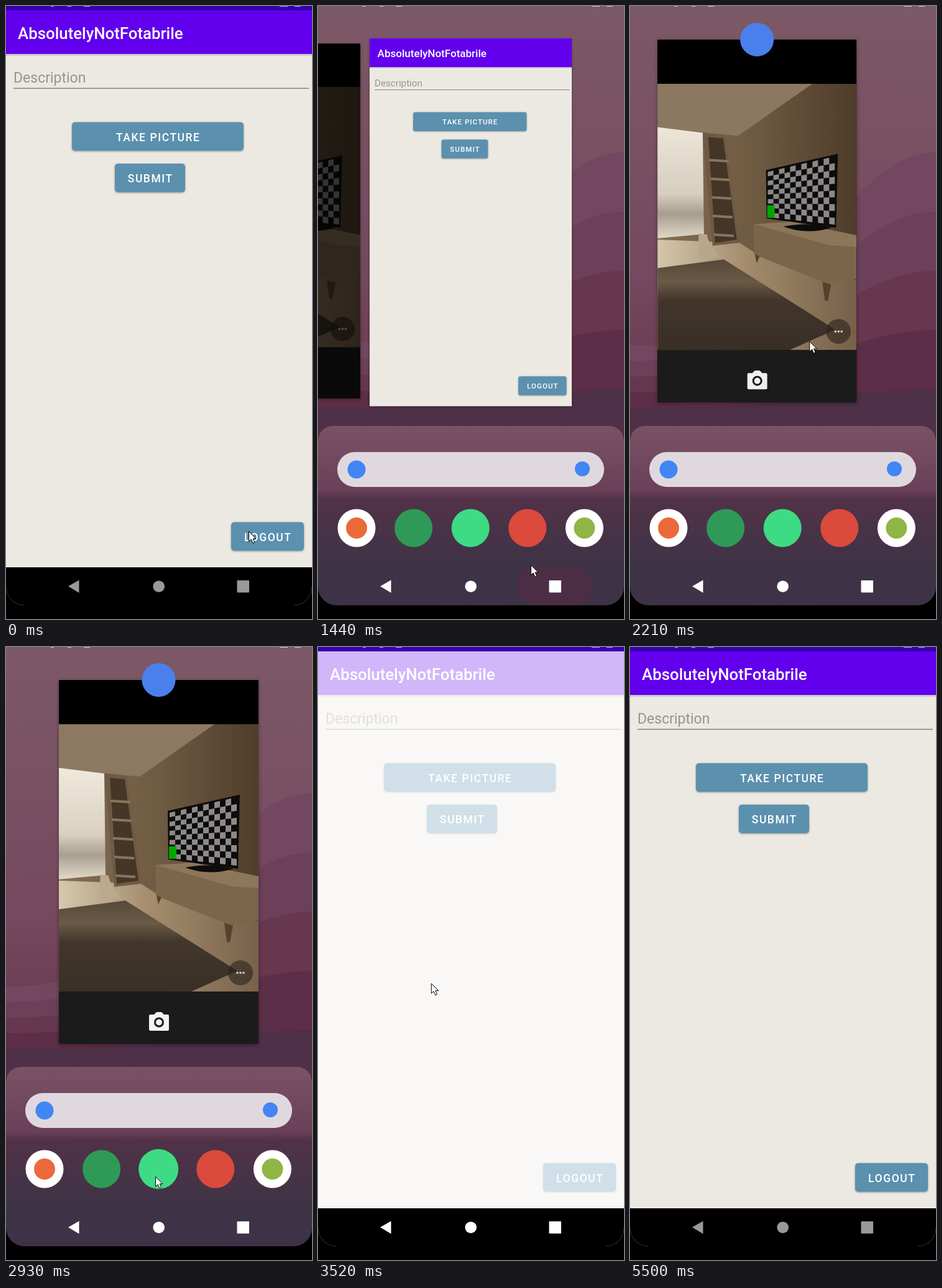
An HTML page that plays this animation: 492x984 px, repeating every 5900 ms.

```html
<!DOCTYPE html>
<html lang="en">
<head>
<meta charset="utf-8">
<title>Phone demo</title>
<style>
  html, body { margin: 0; width: 100%; height: 100%; overflow: hidden; background: #000; }
  svg { display: block; width: 492px; height: 984px; }
  text { font-family: Roboto, "Noto Sans", sans-serif; }
  .title { font-size: 25.8px; font-weight: 500; fill: #fff; }
  .hint { font-size: 23px; fill: #979591; }
  #buttons text { font-size: 17.5px; font-weight: 500; letter-spacing: 1.56px; fill: #fff; text-anchor: middle; }
  #buttons rect { fill: #5b90af; filter: drop-shadow(0 1.5px 1.5px rgba(0,0,0,.4)); }
  .card { filter: drop-shadow(0 2px 3px rgba(0,0,0,.35)); }
</style>
</head>
<body>
<svg viewBox="0 0 492 984">
  <defs>
    <linearGradient id="sky" x2="0" y2="1">
      <stop offset="0" stop-color="#7c5967"/><stop offset=".45" stop-color="#75495f"/>
      <stop offset=".62" stop-color="#6b3a50"/><stop offset=".76" stop-color="#451a3c"/>
      <stop offset=".83" stop-color="#170422"/><stop offset="1" stop-color="#100418"/>
    </linearGradient>
    <linearGradient id="tray" x2="0" y2="1">
      <stop offset="0" stop-color="#7a5265"/><stop offset=".32" stop-color="#6b4058"/>
      <stop offset=".37" stop-color="#513248"/><stop offset=".7" stop-color="#3f3346"/>
      <stop offset="1" stop-color="#3c3247"/>
    </linearGradient>
    <linearGradient id="wall">
      <stop offset="0" stop-color="#846f55"/><stop offset=".5" stop-color="#6f5a42"/>
      <stop offset="1" stop-color="#4f3d2b"/>
    </linearGradient>
    <linearGradient id="pane" x2="0" y2="1">
      <stop offset="0" stop-color="#f0e9dc"/><stop offset=".6" stop-color="#d9d0c0"/>
      <stop offset=".78" stop-color="#a89f91"/><stop offset="1" stop-color="#e2d9c9"/>
    </linearGradient>
    <linearGradient id="floor">
      <stop offset="0" stop-color="#d6c8ae"/><stop offset=".45" stop-color="#a58d6d"/>
      <stop offset="1" stop-color="#77614a"/>
    </linearGradient>
    <linearGradient id="rug" x2="0" y2="1">
      <stop offset="0" stop-color="#57483a"/><stop offset=".25" stop-color="#6b5a47"/>
      <stop offset=".45" stop-color="#43372c"/><stop offset="1" stop-color="#3a2f26"/>
    </linearGradient>
    <clipPath id="screen"><rect y="-40" width="492" height="1002" rx="30"/></clipPath>
    <clipPath id="photo"><rect x="85" y="124" width="321" height="429"/></clipPath>
  </defs>

  <rect width="492" height="984"/>
  <g clip-path="url(#screen)">
    <g id="paper"><rect width="492" height="962" fill="url(#sky)"/></g>
    <g id="recents">
      <g id="camera">
        <g class="card">
          <rect x="85" y="53" width="321" height="584"/>
          <rect x="85" y="553" width="321" height="84" fill="#1b1b1b"/>
          <g id="room" clip-path="url(#photo)"></g>
          <circle cx="377" cy="523" r="20" fill="#2a231c" opacity=".6"/>
          <path d="M372 523h0m5 0h0m5 0h0" stroke="#d8d4cf" stroke-width="3.6" stroke-linecap="round"/>
          <path d="M232 590h6l4-4h8l4 4h6a2 2 0 0 1 2 2v22a2 2 0 0 1-2 2h-28a2 2 0 0 1-2-2v-22a2 2 0 0 1 2-2z" fill="#f3f3f3"/>
          <circle cx="246" cy="602.500" r="6.500" fill="#f3f3f3" stroke="#1b1b1b" stroke-width="3"/>
        </g>
        <rect id="dim" x="85" y="53" width="321" height="584"/>
      </g>
      <circle id="camIcon" r="27" fill="#4a80ec"/>
    </g>
    <g id="panel">
      <rect y="674" width="492" height="320" rx="24" fill="url(#tray)"/>
      <rect x="31" y="716" width="429" height="56" rx="28" fill="#dfd9df"/>
      <circle cx="62" cy="744" r="14.500" fill="#4285f4"/>
      <circle cx="425" cy="743" r="12" fill="#4285f4"/>
      <g id="dock"></g>
    </g>
    <rect id="ripple" y="901" height="61" rx="30" fill="#5c2b42"/>
    <g id="window">
      <rect id="white" fill="#fff"/>
      <rect id="strip" fill="#3700b3"/>
      <rect id="base"/>
    </g>
    <g id="app">
      <rect class="card" y="7" width="492" height="894" fill="#ece9e2"/>
      <rect y="77" width="492" height="3" opacity=".12"/>
      <rect y="7" width="492" height="70" fill="#6200ee"/>
      <text class="title" x="19" y="53">AbsolutelyNotFotabrile</text>
      <text class="hint" x="12" y="123">Description</text>
      <rect x="12" y="131.500" width="475" height="1.300" fill="#787672"/>
      <g id="buttons"></g>
    </g>
    <circle id="appIcon" cx="246" r="27" fill="#3ddc84"/>
    <path d="M72 .5h5m22 0h6m20 0h10M440 .5h13m11 0h10" stroke="#fff" opacity=".7"/>
  </g>
  <g id="nav">
    <path d="M100 931.500L117.500 921.500V942z"/>
    <circle cx="245.700" cy="931.700" r="9.300"/>
    <rect x="371.500" y="922" width="19.500" height="19.500" rx="1"/>
  </g>
  <path id="cursor" d="M.5.5V16.500L4.300 13L7 19.300L9.800 18L7.200 12H12z" fill="#fff" stroke="#000"/>
</svg>

<script>
const LOOP = 5900;
const $ = id => document.getElementById(id);
const set = (el, attrs) => {
  for (const k in attrs) el.setAttribute(k, attrs[k]);
  return el;
};
const add = (parent, tag, attrs) =>
  $(parent).appendChild(set(document.createElementNS("http://www.w3.org/2000/svg", tag), attrs));
const shape = (parent, fill, d) => add(parent, "path", { fill, d });

// wallpaper: ridges that rise to the right
["#72475f", "#6c4059", "#67374f", "#5d2e47", "#4e3048"].forEach((color, i) => {
  const left = 545 + i * 25, right = 235 + i * 95;
  shape("paper", color, `M0 ${left}Q200 ${left} 300 ${(left + right) / 2}T492 ${right}V700H0z`);
});
shape("paper", "url(#sky)", "M0 690H492V962H0z").setAttribute("opacity", 0);
shape("paper", "#2d0d2e", "M0 690H492V790H0z");
shape("paper", "#170422", "M0 785Q240 760 492 772V962H0z");

// room in the camera preview
const room = (fill, d) => shape("room", fill, d);
room("url(#wall)", "M85 124H406V553H85z");
room("#8d7961", "M85 124H335L215 208L85 195z");
room("url(#pane)", "M85 194L158 203L160 366L85 373z");
room("url(#floor)", "M85 375L217 380L245 398L406 440V553H85z");
room("#6f5b45", "M158 203L194 207L218 380L174 385z");
room("#463628", "M167 210L191 212L213 375L178 380z");
for (let i = 0; i < 5; i++) room("#8b765b", `M${168 + i * 2} ${245 + i * 30}l32 2v4l-32-2z`);
room("url(#rug)", "M85 421L192 407L372 520L298 553H85z");
room("#7b664c", "M240 350L406 376V438L362 447L241 399z");
room("#8d775a", "M240 350L300 346L406 368V387L362 384z");
room("#54432f", "M242 399L250 402L245 413zM351 443L365 447L360 474L355 473z");
room("#bba98d", "M153 405Q150 380 152 365L165 367Q166 380 185 404z");
room("#0d0c0b", "M288 354Q325 346 366 356Q325 368 288 354zM260 263L376 237L373 356L261 341z");

// checkerboard on the television, in perspective
const COLS = 12, ROWS = 10;
const onTv = (c, r) => {
  const u = c / COLS, top = 266 - 25 * u, bottom = 339 + 12 * u;
  return `${263 + 108 * u} ${top + (bottom - top) * r / ROWS}`;
};
for (let c = 0; c < COLS; c++)
  for (let r = c % 2; r < ROWS; r += 2)
    room("#8c8a8b", `M${onTv(c, r)}L${onTv(c + 1, r)}L${onTv(c + 1, r + 1)}L${onTv(c, r + 1)}z`);
room("#00a800", "M262 320H274V340H262z");

// dock icons, some on a white disc
["#ea6a3c", "#2f9a57", "#3ddc84", "#db4a3c", "#8fb545"].forEach((fill, i) => {
  const cx = 62 + i * 91.6, cy = 838, onDisc = i % 4 === 0;
  if (onDisc) add("dock", "circle", { cx, cy, r: 30.5, fill: "#fff" });
  add("dock", "circle", { cx, cy, r: onDisc ? 17 : 30.5, fill });
});
const launcher = $("dock").children[3];

const button = (label, x, y, width) => {
  add("buttons", "rect", { x, y, width, height: 45.7, rx: 5 });
  add("buttons", "text", { x: x + width / 2 + 0.8, y: y + 30 }).textContent = label;
};
button("TAKE PICTURE", 106, 186.5, 276);
button("SUBMIT", 175, 253, 113);
button("LOGOUT", 362, 828.5, 117);

// pointer stops: time, x, y
const STOPS = [
  [60, 390, 843], [230, 400, 855], [570, 400, 855], [1160, 381, 932], [1440, 342, 898], [1800, 308, 570],
  [2060, 294, 297], [2380, 282, 808], [2600, 240, 850], [2930, 240, 850], [3170, 234, 808], [4070, 100, 120],
  [4200, 46, 40], [4430, 364, 57], [4680, 370, 58], [4900, 25, 75], [5230, 378, 597], [5500, 500, 990]
];

const mix = (a, b, f) => a + (b - a) * f;
const ramp = (t, from, to) => Math.min(1, Math.max(0, (t - from) / (to - from)));
const easeOut = (f, power = 3) => 1 - (1 - f) ** power;

function pointer(t) {
  const next = STOPS.findIndex(s => s[0] > t);
  if (next < 1) return STOPS.at(next).slice(1);
  const a = STOPS[next - 1], b = STOPS[next], f = ramp(t, a[0], b[0]);
  return [mix(a[1], b[1], f), mix(a[2], b[2], f)];
}

function render(t) {
  const home = t >= 1200 && t < 3300;
  const leave = 1 - ramp(t, 2950, 3070);
  set($("paper"), { opacity: +home });

  // the app shrinks to a card, is flicked away, then opens again
  const reopened = t > 3300;
  const shrink = reopened ? 0 : easeOut(ramp(t, 1200, 1537));
  const flick = reopened ? 0 : ramp(t, 1800, 2160) ** 1.5;
  const lift = 652 * flick;
  const opacity = reopened ? ramp(t, 3470, 3650) : flick < 1 ? 1 - flick / 3 : 0;
  set($("app"), {
    transform: `translate(${85 * shrink} ${mix(7, 53, shrink) - lift}) scale(${1 - 0.3475 * shrink}) translate(0 -7)`,
    opacity
  });
  set($("appIcon"), { cy: 53 - lift, r: 27 * ramp(t, 1500, 1640), opacity: reopened ? 0 : opacity });

  // the camera card slides to the middle
  const away = (1 - ramp(t, 1980, 2380)) ** 2.4;
  const slide = -327 * away - 300 * (1 - shrink) * home;
  const size = 1 + slide * 7.6e-5, middle = 245.5 + slide;
  set($("camera"), { transform: `translate(${middle} 345) scale(${size}) translate(-245.5 -345)` });
  set($("dim"), { opacity: 0.62 * away ** 2 });
  set($("camIcon"), { cx: middle, cy: 345 - 292 * size });
  set($("recents"), { opacity: home * leave });

  set($("panel"), { transform: `translate(0 ${290 * (1 - easeOut(ramp(t, 1200, 1420)))})`, opacity: home * leave });
  set(launcher, { r: 30.5 + 1.5 * Math.sin(Math.PI * ramp(t, 2840, 3020)) });

  const spread = 61 * easeOut(ramp(t, 1060, 1250));
  set($("ripple"), { x: 381 - spread, width: spread * 2, opacity: 0.55 * (ramp(t, 1060, 1200) - ramp(t, 1400, 1700)) });

  // launch window grows out of the dock icon
  const grow = t < 1200 ? 1 : ramp(t, 2960, 3300);
  const across = easeOut(grow), down = easeOut(grow, 2.5);
  const x = mix(215, 0, across), y = mix(808, 0, down);
  const width = mix(60, 492, across), bottom = mix(868, 962, down), foot = 61 * grow ** 1.4;
  set($("white"), { x, y, width, height: bottom - y });
  set($("strip"), { x, y, width, height: 7 * grow ** 2.5 });
  set($("base"), { x, y: bottom - foot, width, height: foot });
  set($("window"), { opacity: t < 1200 ? 1 : ramp(t, 2960, 3040) });

  const gray = Math.round(153 + 102 * (ramp(t, 960, 1140) - ramp(t, 4070, 4510)));
  set($("nav"), { fill: `rgb(${gray},${gray},${gray})` });
  set($("cursor"), { transform: `translate(${pointer(t)})` });
}

const start = performance.now();
function tick() {
  render((performance.now() - start) % LOOP);
  requestAnimationFrame(tick);
}
tick();
</script>
</body>
</html>
```
